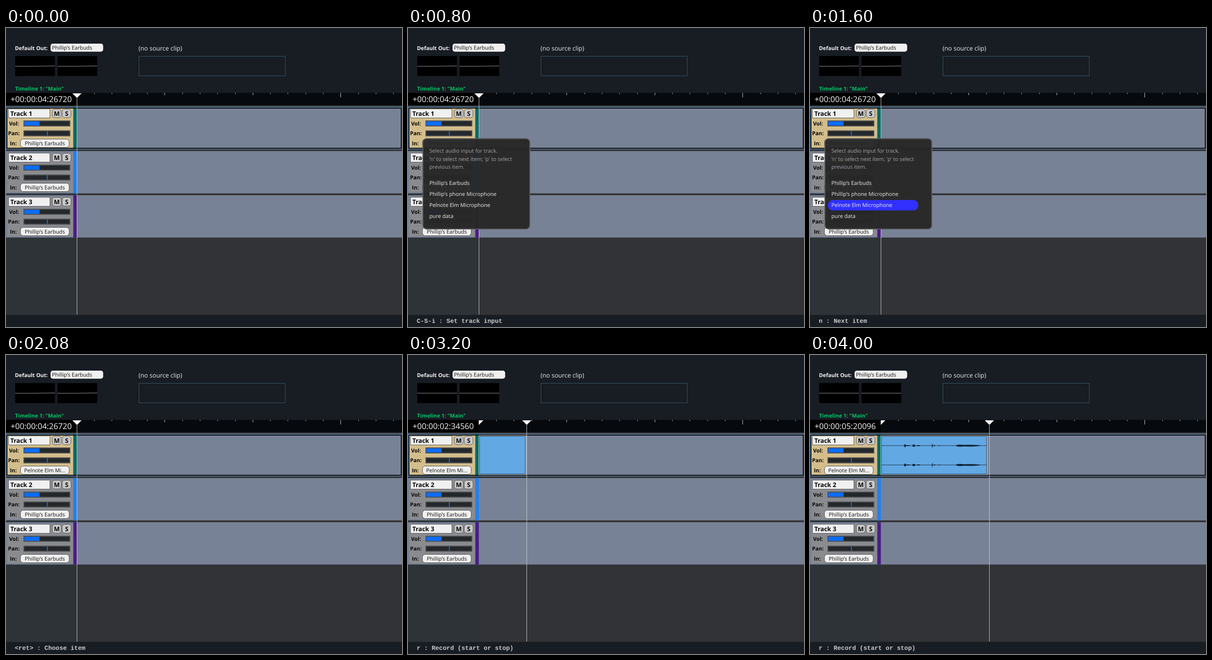
An HTML page for the animation above (5120 ms loop, 862 by 650 pixels).

```html
<!DOCTYPE html>
<html lang="en">
<head>
<meta charset="utf-8">
<title>Track input and recording</title>
<style>
  html, body { margin: 0; width: 100%; height: 100%; overflow: hidden; background: #181c23; }
  svg { display: block; width: 862px; height: 650px; }
  text { font: 11.6px "Open Sans", "Noto Sans", sans-serif; text-rendering: geometricPrecision; white-space: pre; }
  .b { font-weight: 700; }
  .m { font-size: 13.5px; }
  .l { font-size: 17.4px; }
  #status { font: 700 13.5px "Liberation Mono", monospace; }
</style>
</head>
<body>
<svg id="stage" viewBox="0 0 862 650"></svg>
<script>
const LOOP = 5120, STEP = 160, RATE = 48000, BLOCK = 512;
const ORIGIN = 154.3, PX_PER_SEC = 38.3;
const HEADSET = 'Phillip’s Earbuds', LAPTOP = 'Pelnote Elm Microphone';

const rect = (x, y, w, h, fill, extra = '') =>
  `<rect x="${x}" y="${y}" width="${w}" height="${h}" fill="${fill}" ${extra}/>`;
const text = (x, y, str, fill, cls = '', extra = '') =>
  `<text x="${x}" y="${y}" fill="${fill}" class="${cls}" ${extra}>${str}</text>`;
const centered = 'text-anchor="middle"';

function ruler() {
  let out = rect(0, 141, 862, 27, '#06090d') + rect(0, 141, 154, 27, '#000');
  for (let k = 1; k <= 18; k++) {
    const height = k % 15 === 0 ? 10 : k % 5 === 0 ? 5 : 2.5;
    out += rect(Math.floor(ORIGIN + k * PX_PER_SEC), 141, 1, height, '#d0d2d4');
  }
  return out;
}

function track(i, color) {
  const button = (x, label) =>
    rect(x, 176.5, 19, 18.5, '#c9c9c9', 'rx="5" stroke="#55565a"') +
    text(x + 9.6, 191, label, '#0a0a0a', 'b m', centered);
  const slider = y => rect(39, y, 100, 11, '#24282b', 'stroke="#505152" stroke-width="2"');
  const label = (x, y, str) => text(x, y, str, '#050505', 'b');
  return `<g transform="translate(0 ${i * 96})">` +
    rect(0, 171.5, 862, 92, '#788296') +
    rect(3, 175, 143.5, 86, i ? '#898b8f' : '#d3bd8b') +
    rect(146.5, 171.5, 7.7, 92, color) +
    rect(5.5, 176, 90, 19.5, '#f0f0f0', 'stroke="#55565a"') +
    text(9.5, 191, 'Track ' + (i + 1), '#050505', 'b m') +
    button(101, 'M') + button(122.5, 'S') +
    label(6.7, 211.7, 'Vol:') + slider(202) + rect(40, 203, 33, 9, '#0b6cfa') +
    label(4.5, 233.2, 'Pan:') + slider(223.5) + rect(89, 224, 2, 10, '#0b6cfa') +
    label(8.5, 255, 'In:') +
    rect(31.5, 241.5, 106, 18, '#f0f0f0', 'rx="6" stroke="#4a4b4e"') +
    text(84.5, 254.7, HEADSET, '#111', '', `${centered} id="input${i}"`) +
    '</g>';
}

function popup() {
  const help = ['Select audio input for track.', "'n' to select next item; 'p' to select", 'previous item.'];
  const items = [HEADSET, 'Phillip’s phone Microphone', LAPTOP, 'pure data'];
  return '<g id="popup">' +
    rect(32.5, 240.5, 232.5, 196.5, '#282828', 'rx="8" fill-opacity=".97" stroke="#58595b" stroke-width="2"') +
    rect(39, 326, 196.5, 22.5, '#3230ff', 'rx="10" id="highlight"') +
    help.map((s, i) => text(46.5, 271.3 + i * 17.2, s, '#a6a6a6')).join('') +
    items.map((s, i) => text(46.5, 341 + i * 24, s, '#eee')).join('') + '</g>';
}

// Bursts: centre, half width, amplitude
const bursts = [[207, 2, 4], [213, 5, 1.2], [226, 3, 3.5], [236, 4, 1.4], [266.5, .6, 8],
                [271, 1.5, 1.6], [281.5, .6, 2.2], [327, 9, 3.2], [346, 24, 2.4]];
function waveform(mid) {
  let d = `M156 ${mid}H384`;
  for (let x = 200; x < 372; x += .6) {
    const env = Math.max(0, ...bursts.map(([c, w, a]) =>
      Math.abs(x - c) < w ? a * Math.sqrt(1 - ((x - c) / w) ** 2) : 0));
    const amp = env * (.75 + .25 * Math.sin(x * 5.3));
    if (amp > .2) d += `M${x.toFixed(1)} ${(mid - amp * .85).toFixed(1)}v${(amp * 1.8).toFixed(1)}`;
  }
  return `<path d="${d}" stroke="#07131f" stroke-width=".8" fill="none"/>`;
}

const meter = x => rect(x, 61, 86.5, 43.5, '#000') + '<path class="signal" stroke="#9a9a9a" fill="none"/>';

document.getElementById('stage').innerHTML =
  text(19.5, 48, 'Default Out:', '#f4f4f4', 'b') +
  rect(97, 34, 114.5, 17.5, '#f0f0f0', 'rx="5"') + text(100, 47.2, HEADSET, '#111') +
  meter(20) + meter(112) +
  text(288.5, 49, '(no source clip)', '#eceded', 'm') +
  rect(289.5, 61.5, 318.5, 42.5, 'none', 'stroke="#36596a"') +
  text(19.8, 136.3, 'Timeline 1: "Main"', '#05c466', 'b') +
  rect(0, 168, 862, 455.5, '#323336') + rect(0, 168, 154, 455.5, '#2d3336') +
  ruler() + text(10, 161, '', '#f6f6f6', 'l', 'id="clock"') +
  ['#076a69', '#2180f1', '#4a1d87'].map((c, i) => track(i, c)).join('') +
  rect(.5, 172, 861, 91, 'none', 'stroke="#6aa3d8"') +
  rect(2, 174, 858.5, 87.5, 'none', 'stroke="#000" stroke-width="2"') +
  '<g id="clip">' +
    rect(154.5, 175.5, 0, 84.5, '#62a8e3', 'class="body" stroke="#fff"') +
    rect(155.5, 176.5, 0, 82.5, 'none', 'class="inner" stroke="#101820"') +
    `<g id="wave">${waveform(197)}${waveform(239)}</g></g>` +
  '<path id="start" d="M154 142h10l-10 10z" fill="#fff"/>' +
  '<g id="head"><path d="M-9.5 142h20l-10 10z" fill="#fff"/>' + rect(0, 150, 1, 473, '#c9cacb') + '</g>' +
  popup() + text(19, 641, '', '#c8cacc', '', 'id="status"');

const $ = id => document.getElementById(id);
const show = (id, on) => $(id).setAttribute('visibility', on ? 'visible' : 'hidden');
const signals = document.querySelectorAll('.signal');

// Start time and status line of each command
const commands = [[0, ''], [320, 'C-S-i : Set track input'], [1120, 'n : Next item'],
                  [2080, '<ret> : Choose item'], [2560, 'r : Record (start or stop)']];
const OPEN = 800, NEXT = [1120, 1280, 1600], CHOOSE = 2080, RECORD = 2560, ROLL = 2720, STOP = 4000;
const blocks = [66, 129, 192, 255, 317, 380, 444, 508];

function clock(samples) {
  const seconds = Math.floor(samples / RATE);
  return '+00:00:0' + seconds + ':' + String(samples % RATE).padStart(5, '0');
}

function render(t) {
  $('status').textContent = commands.filter(c => c[0] <= t).pop()[1];

  const selected = NEXT.filter(at => at <= t).length - 1;
  show('popup', t >= OPEN && t < CHOOSE);
  show('highlight', selected >= 0 && t < CHOOSE);
  $('highlight').setAttribute('y', 326 + Math.max(0, selected) * 24);
  $('input0').textContent = t < CHOOSE ? HEADSET : LAPTOP.slice(0, 14) + '...';

  const rolling = t >= ROLL, stopped = t >= STOP;
  const step = Math.min(blocks.length - 1, Math.floor((t - ROLL) / STEP));
  const samples = rolling ? blocks[step] * BLOCK : t < RECORD ? 4 * RATE + 26720 : 0;
  $('clock').textContent = clock(samples);

  const x = stopped ? 390.2 : ORIGIN + (rolling ? samples / RATE * PX_PER_SEC : 0);
  $('head').setAttribute('transform', `translate(${Math.floor(x)} 0)`);
  show('start', rolling);
  show('clip', rolling);
  show('wave', stopped);
  const end = stopped ? 385 : Math.floor(x) - 2;
  document.querySelector('.body').setAttribute('width', end - 154);
  document.querySelector('.inner').setAttribute('width', end - 156);

  signals.forEach((s, i) =>
    s.setAttribute('d', `M${20 + i * 92} 83.${rolling ? 0 : 2}h36l50.5 ${rolling ? 0 : -.7}`));
}

function loop() {
  render(performance.now() % LOOP);
  requestAnimationFrame(loop);
}
loop();
</script>
</body>
</html>
```
